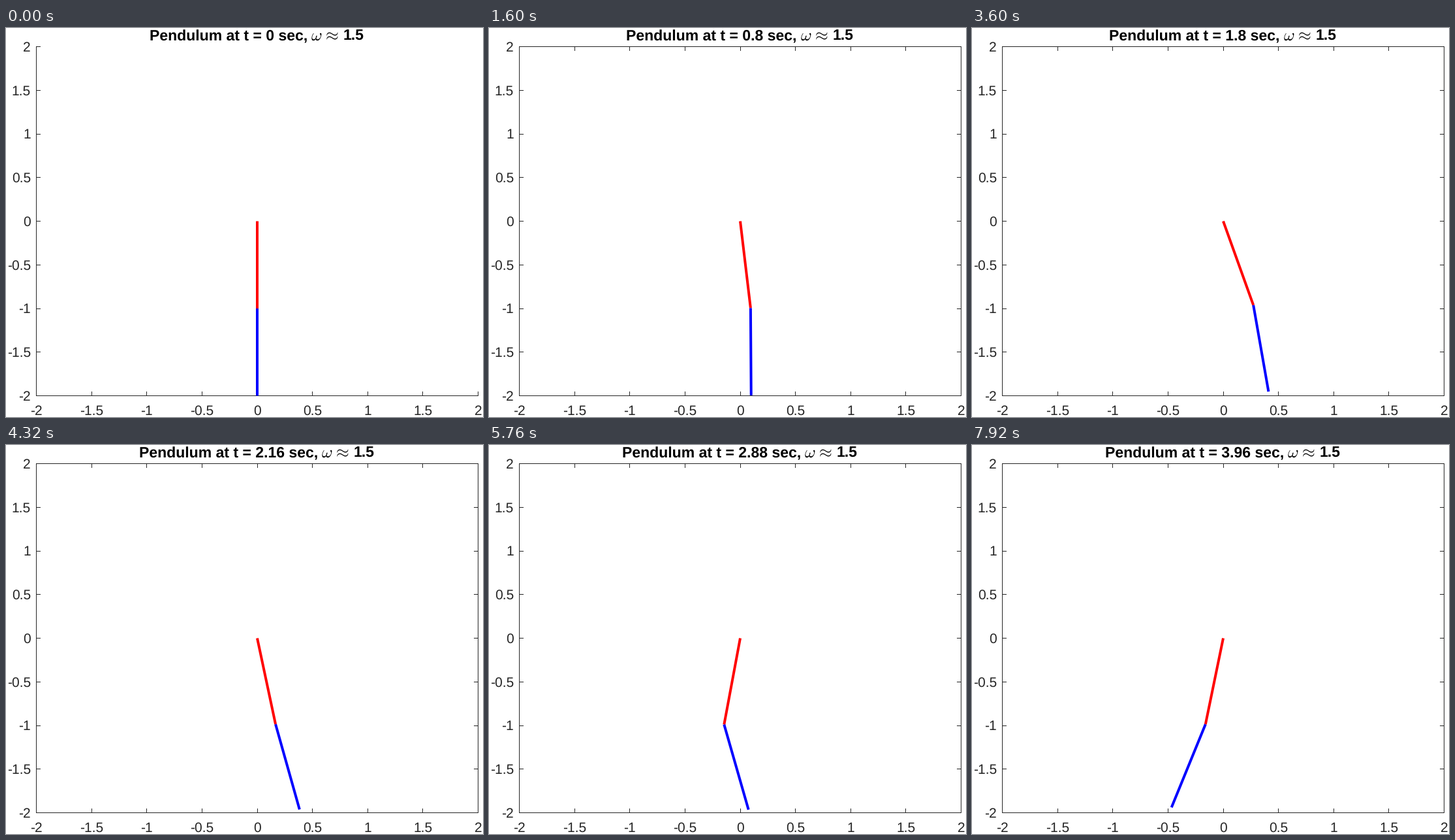
A matplotlib script for the animation above (8000 ms loop, 731 px wide and 595 px high).

```python
import math

import matplotlib.pyplot as plt
from matplotlib.animation import FuncAnimation
from matplotlib.collections import LineCollection
from matplotlib.patches import Rectangle

W, H, DPI = 731, 595, 100
FRAMES, INTERVAL, DT = 100, 80, 0.04
LEFT, RIGHT, TOP, BOTTOM = 46.5, 723.5, 28.5, 562.5
TICK = 6.5
TICK_SIZE, TITLE_SIZE, MATH_SIZE = 21, 23, 25.5
GRAY = (0.15, 0.15, 0.15)

plt.rcParams.update({
    "font.family": "Liberation Sans",
    "mathtext.fontset": "cm",
    "text.hinting": "none",
})


def px(size):
    """Pixels to points."""
    return size * 72 / DPI


def to_x(v):
    return LEFT + (v + 2) * (RIGHT - LEFT) / 4


def to_y(v):
    return BOTTOM - (v + 2) * (BOTTOM - TOP) / 4


def advance(number, size):
    """Set width of a number in the sans face."""
    widths = {"-": 0.333, ".": 0.278}
    return size * sum(widths.get(ch, 0.556) for ch in number)


# Two coupled swings, the first one driven by a sine; resting start.
OMEGA, NU1, NU2 = 1.494, 1.2476, 2.6968
FORCE, COUPLING, STIFFNESS = 0.977, 1.488, 2.48


def mode(nu, t):
    wave = math.sin(OMEGA * t) - OMEGA / nu * math.sin(nu * t)
    return wave / (nu ** 2 - OMEGA ** 2)


def angles(t):
    slow, fast = mode(NU1, t), mode(NU2, t)
    gain = FORCE / (NU2 ** 2 - NU1 ** 2)
    upper = gain * ((STIFFNESS - NU1 ** 2) * slow
                    + (NU2 ** 2 - STIFFNESS) * fast)
    lower = gain * COUPLING * (slow - fast)
    return upper, lower


fig = plt.figure(figsize=(W / DPI, H / DPI), dpi=DPI, facecolor="white")
ax = fig.add_axes([0, 0, 1, 1])
ax.set_xlim(0, W)
ax.set_ylim(H, 0)
ax.axis("off")


def add_segments(segments):
    lines = LineCollection(segments, colors=[GRAY], linewidths=px(1), zorder=1)
    lines.set_snap(False)
    ax.add_collection(lines, autolim=False)
    return lines


def add_text(x, y, s, size, **kw):
    return ax.text(x, y, s, fontsize=px(size), ha="left", va="baseline", **kw)


# Axes: left and bottom always shown, the rest of the box added later.
near = [((LEFT, TOP - .5), (LEFT, BOTTOM + .5)),
        ((LEFT - .5, BOTTOM), (RIGHT + .5, BOTTOM))]
far = [((RIGHT, TOP - .5), (RIGHT, BOTTOM + .5)),
       ((LEFT - .5, TOP), (RIGHT + .5, TOP))]
for k in range(9):
    value = -2 + k / 2
    label = f"{value:g}"
    x, y = to_x(value), to_y(value)
    tx, ty = math.floor(x) + .5, math.floor(y) + .5
    near += [((tx, BOTTOM), (tx, BOTTOM - TICK)), ((LEFT, ty), (LEFT + TICK, ty))]
    far += [((tx, TOP), (tx, TOP + TICK)), ((RIGHT, ty), (RIGHT - TICK, ty))]
    width = advance(label, TICK_SIZE)
    add_text(x - width / 2, 592, label, TICK_SIZE, color=GRAY)
    add_text(38 - width, round(y + 7.4), label, TICK_SIZE, color=GRAY)
add_segments(near)
box = add_segments(far)

frame_clip = Rectangle((LEFT - .5, TOP - .5), RIGHT - LEFT + 1, BOTTOM - TOP + 1,
                       transform=ax.transData)


def add_rod(color):
    rod, = ax.plot([], [], color=color, lw=px(4), solid_capstyle="butt", zorder=3)
    rod.set_snap(False)
    rod.set_clip_path(frame_clip)
    return rod


red_rod, blue_rod = add_rod("#ff0000"), add_rod("#0000ff")

TITLE_Y, CENTER = 19, 384.3
WORDS = 10.254 * TITLE_SIZE    # title words without the time value
SYMBOLS = 48.6                 # omega, approx and the spaces after them
title = add_text(0, TITLE_Y, "", TITLE_SIZE, weight="bold")
symbols = add_text(0, TITLE_Y, r"$\omega\hspace{0.085}\approx$", MATH_SIZE)
rate = add_text(0, TITLE_Y, "1.5", TITLE_SIZE, weight="bold")


def draw(i):
    t = i * DT
    stamp = f"{t:g}"
    words = WORDS + advance(stamp, TITLE_SIZE)
    start = CENTER - (words + SYMBOLS + advance("1.5", TITLE_SIZE)) / 2
    title.set_text(f"Pendulum at t = {stamp} sec,")
    title.set_x(start)
    symbols.set_x(start + words - 1)
    rate.set_x(start + words + SYMBOLS)

    upper, lower = angles(t)
    x1, y1 = math.sin(upper), -math.cos(upper)
    x2, y2 = x1 + math.sin(lower), y1 - math.cos(lower)
    red_rod.set_data([to_x(0), to_x(x1)], [to_y(0), to_y(y1)])
    blue_rod.set_data([to_x(x1), to_x(x2)], [to_y(y1), to_y(y2)])
    box.set_visible(i > 0)
    return red_rod, blue_rod, box, title, symbols, rate


anim = FuncAnimation(fig, draw, frames=FRAMES, interval=INTERVAL,
                     repeat=True, repeat_delay=0, blit=False)
plt.show()
```
